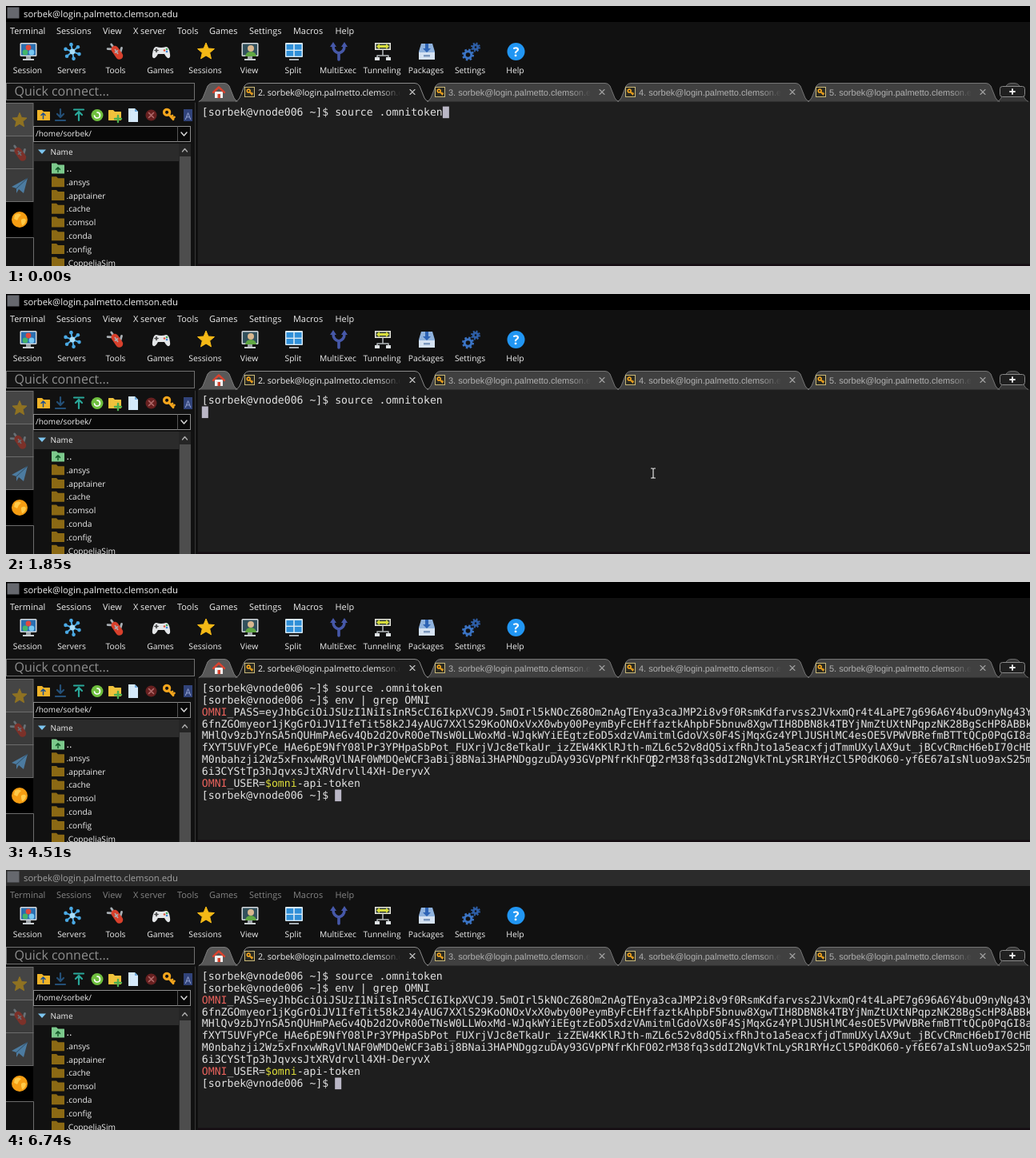
An HTML page for the animation above (6780 ms loop, 1280 by 325 pixels).

```html
<!DOCTYPE html>
<html lang="en">
<head>
<meta charset="utf-8">
<title>Terminal session</title>
<style>
  html, body { margin: 0; width: 100%; height: 100%; overflow: hidden; background: #111; }
  svg { display: block; width: 100vw; height: 100vh; }
  text { font-family: "Open Sans", "Noto Sans", sans-serif; text-rendering: geometricPrecision; white-space: pre; }
  .mono text { font-family: "DejaVu Sans Mono", monospace; font-size: 13.16px; fill: #e2e2e2; }
  .tab { font-family: "Liberation Sans", sans-serif; font-size: 11px; }
</style>
</head>
<body>
<svg id="stage" viewBox="0 0 1280 325" xmlns="http://www.w3.org/2000/svg"></svg>
<script>
const LOOP = 6780;
const USER = "sorbek";
const HOST = USER + "@login.palmetto.clemson.edu";

// Shape helpers
const rect = (x, y, w, h, fill, more = "") =>
  `<rect x="${x}" y="${y}" width="${w}" height="${h}" fill="${fill}" ${more}/>`;
const circle = (x, y, r, fill, more = "") => `<circle cx="${x}" cy="${y}" r="${r}" fill="${fill}" ${more}/>`;
const shape = (d, fill, more = "") => `<path d="${d}" fill="${fill}" ${more}/>`;
const line = (d, color, w = 1) =>
  `<path d="${d}" fill="none" stroke="${color}" stroke-width="${w}" stroke-linecap="round" stroke-linejoin="round"/>`;
const label = (x, y, s, size, fill, more = "") =>
  `<text x="${x}" y="${y}" font-size="${size}" fill="${fill}" ${more}>${s}</text>`;
const group = (s, more) => `<g ${more}>${s}</g>`;
const at = (x, y, s, more = "") => group(s, `transform="translate(${x} ${y}) ${more}"`);

// Icons, each drawn around 0,0
function star(r, fill) {
  let d = "";
  for (let i = 0; i < 10; i++) {
    const a = i * Math.PI / 5, q = i % 2 ? r * 0.45 : r;
    d += (i ? "L" : "M") + (q * Math.sin(a)).toFixed(2) + " " + (-q * Math.cos(a)).toFixed(2);
  }
  return shape(d + "Z", fill, `stroke="${fill}" stroke-linejoin="round"`);
}

function gear(x, y, r, color) {
  const teeth = 2 * Math.PI * r / 16;
  return circle(x, y, r - 2, "none", `stroke="${color}" stroke-width="3"`) +
    circle(x, y, r, "none", `stroke="${color}" stroke-width="2.4" stroke-dasharray="${teeth}"`);
}

const monitor = screen =>
  rect(-10.5, -11, 21, 17, "#d5dade", 'rx="1.5"') + rect(-9, -9.5, 18, 14, screen) +
  rect(-3, 6, 6, 3, "#9da3a8") + rect(-7, 9, 14, 2, "#c9ced2");

const knife = (red, steel) => group(
  line("M-3 -6L-7 -9M3 4L8 0M0 -6V-11", steel, 2.8) + rect(-4.5, -8, 9, 19, red, 'rx="4.5"') +
  line("M0 -3V3M-2 0H2", steel, 1.5), 'transform="rotate(-35)"');

function servers() {
  let s = "";
  for (let i = 0; i < 6; i++) {
    const a = i * Math.PI / 3 + 0.35, x = 9 * Math.cos(a), y = 9 * Math.sin(a);
    s += line(`M0 0L${x} ${y}`, "#4aa9e4", 2) + circle(x, y, 2.3, "#4aa9e4");
  }
  return s + circle(0, 0, 3.4, "#a9ddf8");
}

const key = () => group(
  circle(0, -3, 3, "none", 'stroke="#f3a51d" stroke-width="2.6"') +
  line("M0 0V7M0 6H2.5M0 3.5H2", "#f3a51d", 2.2), 'transform="rotate(-42)"');

const folder = fill => shape("M0 0.5Q0 0 .5 0H6L8 2H15.5Q16 2 16 2.5V12.5Q16 13 15.5 13H.5Q0 13 0 12.5Z", fill);

const tools = [
  ["Session", 28, () => monitor("#2a6fb0") + circle(0, -5, 3.4, "#e04a3c") + circle(-4, 1, 3.4, "#43b56a") + circle(4, 1, 3.4, "#77c7f2")],
  ["Servers", 83, servers],
  ["Tools", 138, () => knife("#d8402c", "#a9b0b5")],
  ["Games", 194, () => shape("M-6 -6Q0 -4 6 -6Q10 -6 11 3Q12 9 8 8Q6 7 4 3H-4Q-6 7 -8 8Q-12 9 -11 3Q-10 -6 -6 -6Z", "#e4e6e8") +
    line("M-6 -3.5V.5M-8 -1.5H-4", "#444", 1.6) + circle(4, -1.5, 1.3, "#e0533f") + circle(7, -3, 1.3, "#43a95c") + circle(7, 0, 1.3, "#3c82d8")],
  ["Sessions", 250, () => star(11, "#f5b916")],
  ["View", 305, () => monitor("#32505c") + circle(1, -4, 4, "#d9b78f") + shape("M-6 6Q-5 0 1 0Q7 0 8 6Z", "#61a844")],
  ["Split", 360, () => rect(-11, -11, 22, 18, "#d7e8f4", 'rx="1"') +
    [[-9.5, -9], [0.8, -9], [-9.5, -1], [0.8, -1]].map(([x, y]) => rect(x, y, 8.7, 6.6, "#2f8fd8")).join("") + rect(-6, 9, 12, 2, "#a6adb2")],
  ["MultiExec", 416, () => line("M0 10V2Q-7 0 -7 -7M0 2Q7 0 7 -7", "#4658a8", 3.6) +
    shape("M-11 -6L-7 -12L-3 -6ZM3 -6L7 -12L11 -6Z", "#4658a8")],
  ["Tunneling", 471, () => rect(-10, -11, 20, 9, "#e8e8e0") + rect(-8.5, -9.5, 17, 6, "#2e3a2f") +
    shape("M-8 -6.5L-4 -10V-8H4V-10L8 -6.5L4 -3V-5H-4V-3Z", "#d7dc3c") +
    line("M0 -2V5M-7 8V5H7V8", "#b4b9bc", 1.5) + rect(-10, 7, 6, 4, "#dfe3e5") + rect(4, 7, 6, 4, "#dfe3e5")],
  ["Packages", 526, () => shape("M-7 -10H7L10 0V10H-10V0Z", "#8fb2dd") + rect(-10, 1, 20, 9, "#d5e2f2") +
    shape("M-2 -10H2V-4H5L0 1L-5 -4H-2Z", "#2d63b5") + rect(-4, 4, 8, 2.5, "#7c98bd")],
  ["Settings", 581, () => gear(-3.5, 4, 6.3, "#3b74c4") + gear(6, -5.5, 4.8, "#2e5ea6")],
  ["Help", 637.5, () => circle(0, 0, 11, "#2196f3") + label(0, 5.8, "?", 16, "#fff", 'text-anchor="middle" font-weight="700"')]
];

const menu = [["Terminal", 5], ["Sessions", 63], ["View", 121], ["X server", 159], ["Tools", 214],
  ["Games", 254], ["Settings", 304], ["Macros", 359], ["Help", 411.5]];

const fade = (id, x1, x2, color) =>
  `<linearGradient id="${id}" gradientUnits="userSpaceOnUse" x1="${x1}" x2="${x2}" y1="0" y2="0">` +
  `<stop stop-color="${color}"/><stop offset="1" stop-color="${color}" stop-opacity="0"/></linearGradient>`;

function tab(x, w, fill, edge) {
  const r = x + w;
  return shape(`M${x} 119.5Q${x + 3} 118.5 ${x + 5} 115L${x + 11} 100Q${x + 13} 96.5 ${x + 17} 96.5` +
    `H${r - 17}Q${r - 13} 96.5 ${r - 11} 100L${r - 5} 115Q${r - 3} 118.5 ${r} 119.5`, fill, `stroke="${edge}"`);
}

function sessionTab(n, x, w, active) {
  const left = active ? 299 : x + 11, id = "fade" + n;
  const ink = active ? "#f0f0f0" : "#b0b0b0", close = active ? 508 : x + 219;
  const text = `${n}. ${HOST}`;
  return fade(id, left + 168, left + 194, ink) + tab(x, w, active ? "#1e1e1e" : "#404040", active ? "#8a8a8a" : "#757575") +
    rect(left - 0.5, 101.5, 12, 12, "#2a2a22", 'stroke="#c9b878"') + at(left + 5.5, 107.5, key(), "scale(.65)") +
    (active ? label(left + 16, 111.5, text, 10.7, `url(#${id})`)
            : label(left + 16, 111.5, text, 11, `url(#${id})`, 'class="tab"')) +
    line(`M${close - 3} 104.5l6 6m0 -6l-6 6`, active ? "#d0d0d0" : "#a0a0a0", 1.1);
}

function tabRow() {
  let s = tab(1239, 39, "#363636", "#6a6a6a");
  for (let n = 5; n > 2; n--) s += sessionTab(n, 526 + 238 * (n - 3), 240, false);
  s += tab(241, 49, "#585858", "#7c7c7c") + sessionTab(2, 287, 241, true);
  s += at(266, 108, shape("M-5 -1H5V7H-5Z", "#f2f2f2") + line("M-7 0L0 -6.5L7 0", "#d9432f", 2.4) + rect(-1.5, 2, 3.5, 5, "#d9432f"));
  s += rect(1242.5, 100.5, 31, 13, "#202020", 'rx="3" stroke="#8a8a8a"') + line("M1258 104V110M1255 107H1261", "#f0f0f0", 1.8);
  return s;
}

function sidebar() {
  let s = rect(0.5, 96.5, 235, 21, "#141414", 'stroke="#707070"') + label(10.5, 112.3, "Quick connect...", 16, "#8e8e8e");
  // Side tabs
  for (let i = 0; i < 3; i++) s += rect(-1, 121.5 + 41 * i, 35, 41, i ? "#3b3b3b" : "#454545", 'stroke="#6c6c6c"');
  s += rect(0, 245, 34, 44, "#000") + line("M0 289.5H34.5V325", "#6c6c6c");
  s += at(17, 143, star(9.5, "#8f7222")) + at(17, 184, knife("#7c3129", "#687075"));
  s += at(17, 225, shape("M-10 1L10 -10L5 9L-1 4L-4 9L-4 3Z", "#4c7ba0") + line("M-4 3L10 -10", "#2f4c63", 1));
  s += at(17, 267, circle(0, 0, 10, "#f59d12") + shape("M-6 -6Q-1 -9 2 -6L-1 -3L-3 1L-7 -1ZM2 0Q7 -3 8 1Q6 7 3 7L2 3Z", "#ffca48"));
  // File tools
  s += at(39, 130, folder("#f0b429")) + line("M46.5 141V134.5M44 136.5L46.5 134L49 136.5", "#1d4f91", 1.5);
  s += line("M68 129V138M64 135L68 139L72 135M62 143H74", "#244f76", 2.2);
  s += line("M91 143V134M87 136L91 132L95 136M85 129.5H97", "#2aa89a", 2.2);
  s += circle(114, 136.5, 7.5, "#6fbf3f") + line("M110.5 137A3.5 3.5 0 1 0 114 133", "#fff", 1.7);
  s += at(128, 130, folder("#f0c23c")) + line("M140 137V145M136 141H144", "#4caf50", 2.4);
  s += shape("M153 128H161L165 132V145H153Z", "#d5e9fa") + shape("M161 128V132H165Z", "#6ca9de");
  s += circle(181.5, 136.5, 7, "#682020") + line("M178.5 133.5l6 6m0 -6l-6 6", "#b06a6a", 1.6);
  s += at(203.5, 135.5, key(), "scale(1.2)");
  s += rect(222, 129, 11, 15, "#31437a") + label(227.5, 141.5, "A", 12, "#98a6d4", 'text-anchor="middle"');
  // Path and list
  s += rect(34.5, 150.5, 196, 19, "#080808", 'stroke="#8c8c8c"') + line("M214.5 151V169", "#555");
  s += label(37, 163.3, `/home/${USER}/`, 10, "#f0f0f0") + line("M219 158L222.5 162L226 158", "#ddd", 1.4);
  s += rect(35, 172, 181, 22, "#2b2b2b") + shape("M40 179.5H50L45 185Z", "#7cc4ee") + label(55.5, 186, "Name", 10, "#f0f0f0");
  s += rect(216, 172, 15, 153, "#252525") + line("M220.5 182L223.5 178.5L226.5 182", "#aaa", 1.4) + rect(217, 188, 14, 137, "#4d4d4d");
  ["..", ".ansys", ".apptainer", ".cache", ".comsol", ".conda", ".config", ".CoppeliaSim"].forEach((name, i) => {
    const y = 203.4 + 16.78 * i;
    s += at(57, y - 7, folder(i ? "#8b6914" : "#7cc98c"));
    if (!i) s += line(`M65 ${y + 4}V${y - 1}M62.5 ${y + 1}L65 ${y - 1.5}L67.5 ${y + 1}`, "#155c2a", 1.5);
    s += label(75.5, y + 3.7, name, i ? 10.2 : 13, "#f0f0f0");
  });
  return s;
}

// Terminal contents
const COL = 7.923, ROW = 14.88, LEFT = 244.8;
const PROMPT = `[${USER}@vnode006 ~]$ `;
const ALNUM = "ABCDEFGHIJKLMNOPQRSTUVWXYZabcdefghijklmnopqrstuvwxyz0123456789";
let seed = 4711;
function noise(n, chars) {
  let s = "";
  while (s.length < n) {
    seed = (seed * 16807) % 2147483647;
    s += chars[seed % chars.length];
  }
  return s;
}
const tint = (s, color) => `<tspan fill="${color}">${s}</tspan>`;
const RED = "#e8625c", YELLOW = "#dede3a";
const OUTPUT = [
  tint("OMNI", RED) + "_PASS=eyJhbGciOiJSUzI1NiIsInR5cCI6IkpXVCJ9." + noise(85, ALNUM),
  noise(131, ALNUM),
  ...[131, 131, 131, 36].map(n => noise(n, ALNUM + "-_")),
  tint("OMNI", RED) + "_USER=" + tint("$omni", YELLOW) + "-api-token"
];

function screen(t) {
  const lines = [PROMPT + "source .omnitoken"];
  if (t < 1850) return lines;
  if (t < 1880) return [...lines, ""];
  const typed = t < 2540 ? "" : t < 2710 ? "source .omnitoken" : t < 3150 ? "cat .omnitoken" : "env | grep OMNI";
  lines.push(PROMPT + typed);
  if (t < 4480) return lines;
  return t < 4510 ? [...lines, ""] : [...lines, ...OUTPUT, PROMPT];
}

function terminal(t) {
  const lines = screen(t), last = lines.length - 1;
  return lines.map((s, i) => `<text x="${LEFT}" y="${(136.9 + ROW * i).toFixed(2)}">${s}</text>`).join("") +
    rect((LEFT + lines[last].length * COL).toFixed(2), (125.6 + ROW * last).toFixed(2), 8, 14.6, "#bab7c6");
}

// Pointer position in held steps, or null while it is outside
function pointer(t) {
  if (t < 150 || t >= 6420) return null;
  if (t < 370) {
    const k = Math.floor((t - 150) / 44) / 5;
    const e = 1 - (1 - k) ** 1.6;
    return [790 + 19 * e, 315 - 91 * e];
  }
  if (t < 6070) return [809, 224];
  const k = Math.floor((t - 6070) / 31.9) / 10, e = k ** 1.4;
  return [808 - 83 * e, 224 + 95 * e];
}

const stage = document.getElementById("stage");
stage.innerHTML =
  rect(0, 0, 1280, 325, "#111") +
  rect(0, 0, 1280, 20, "#000", 'id="bar"') +
  rect(1.5, 1.5, 15, 14, "#66686e") +
  label(22, 14, HOST, 11.3, "#f0f0f0", 'id="title"') +
  group(menu.map(([s, x]) => `<text x="${x}" y="34.5" font-size="10.9">${s}</text>`).join(""), 'id="menu"') +
  tools.map(([s, x, icon]) => at(x, 57, icon()) +
    label(x - 1, 83.6, s, 10.3, "#f0f0f0", 'text-anchor="middle"')).join("") +
  rect(235, 119, 1045, 206, "#1e1e1e") + tabRow() +
  rect(235, 119, 5, 206, "#101010") + line("M236.5 121V325", "#383838") +
  sidebar() +
  group("", 'id="term" class="mono"') +
  rect(240, 322.5, 1040, 2.5, "#150d12") +
  group(circle(0, 0, 12, "#8f8a08", 'id="halo"') +
    line("M-2.5 -6H-1Q0 -6 0 -5V5Q0 6 -1 6H-2.5M2.5 -6H1Q0 -6 0 -5V5Q0 6 1 6H2.5", "#f2f2f2", 1.1), 'id="pointer"');

const el = id => document.getElementById(id);
const [bar, title, menuBar, term, halo, mouse] = ["bar", "title", "menu", "term", "halo", "pointer"].map(el);
let shown = "";

function draw(t) {
  const away = t >= 150 && t < 570;
  const dimTitle = away || t >= 6710, dimMenu = away || t >= 6740;
  bar.setAttribute("fill", dimTitle ? "#2b2b2b" : "#000");
  title.setAttribute("fill", dimTitle ? "#a0a0a0" : "#f0f0f0");
  menuBar.setAttribute("fill", dimMenu ? "#858585" : "#f0f0f0");

  const content = terminal(t);
  if (content !== shown) term.innerHTML = shown = content;

  const pos = pointer(t);
  mouse.setAttribute("visibility", pos ? "visible" : "hidden");
  if (pos) mouse.setAttribute("transform", `translate(${pos[0].toFixed(1)} ${pos[1].toFixed(1)})`);
  halo.setAttribute("opacity", t >= 570 && t < 670 ? 1 : 0);
}

const start = performance.now();
function tick() {
  draw((performance.now() - start) % LOOP);
  requestAnimationFrame(tick);
}
tick();
</script>
</body>
</html>
```
